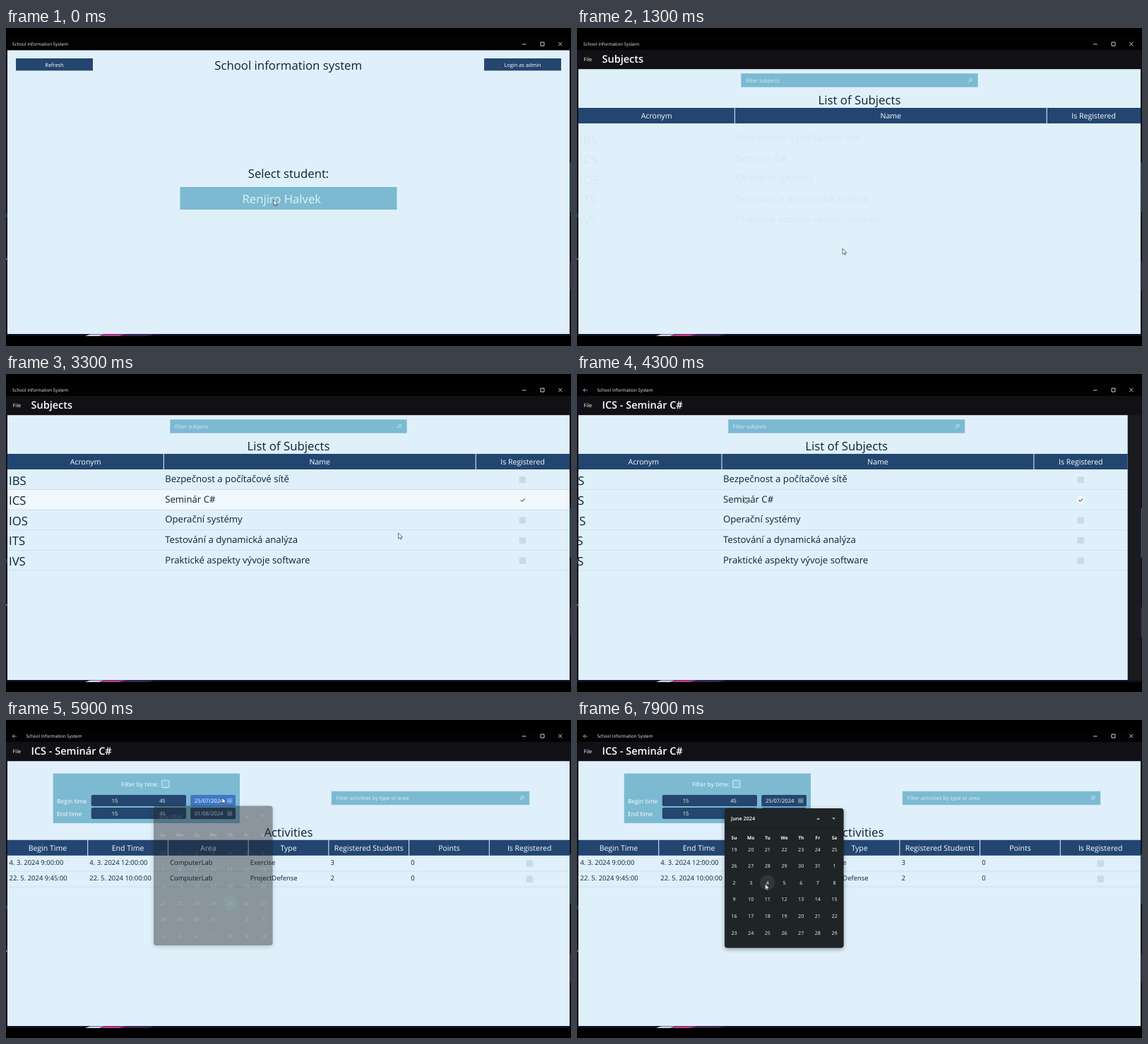
These frames come from a looping animation (800 px wide and 450 px high, 8 s). An HTML page:

```html
<!DOCTYPE html>
<html lang="en">
<head>
<meta charset="utf-8">
<title>School Information System</title>
<style>
html, body { margin: 0; width: 100%; height: 100%; overflow: hidden; background: #000; }
svg { display: block; width: 800px; height: 450px; }
text { font-family: "Open Sans", "Noto Sans", sans-serif; text-rendering: geometricPrecision; white-space: pre; }
</style>
</head>
<body>
<svg id="stage" viewBox="0 0 800 450" xmlns="http://www.w3.org/2000/svg"></svg>
<script>
const LOOP = 8000, STEP = 100;
const SKY = '#dff0fb', NAVY = '#24466f', TEAL = '#7cbad2', INK = '#0c2233', BLUE = '#3f78c6';
const WHITE = '#fff', PALE = '#e2f2f9';

// Drawing helpers
const rect = (x, y, x2, y2, fill, extra = '') =>
  `<rect x="${x}" y="${y}" width="${x2 - x}" height="${y2 - y}" fill="${fill}" ${extra}/>`;
const text = (s, x, y, size, fill = INK, extra = '') =>
  `<text x="${x}" y="${y}" font-size="${size}" fill="${fill}" ${extra}>${s}</text>`;
const mid = (s, x, y, size, fill, extra = '') =>
  text(s, x, y, size, fill, 'text-anchor="middle" ' + extra);
const line = (d, color, w = 0.8) =>
  `<path d="${d}" fill="none" stroke="${color}" stroke-width="${w}"/>`;
const group = (id, body, extra = '') => `<g id="${id}" ${extra}>${body}</g>`;

const lens = (x, y) =>
  `<circle cx="${x + 0.8}" cy="${y - 0.8}" r="2" fill="none" stroke="${PALE}" stroke-width=".7"/>` +
  line(`M${x - 0.6} ${y + 0.6}L${x - 3} ${y + 3}`, PALE);
const searchBox = (x, y, x2, hint) =>
  rect(x, y, x2, y + 19, TEAL, 'stroke="#8fc6da" stroke-width=".6"') +
  text(hint, x + 6.5, y + 12.2, 7.4, '#d6ecf5') + lens(x2 - 10.5, y + 9.5);
const check = (x, y) => rect(x - 4.7, y - 4.7, x + 4.7, y + 4.7, '#cbdbe5', 'rx="1.6"');
const rule = y => rect(2, y - 0.4, 798, y + 0.4, '#c9dde8');

function tableHead(y, edges, labels) {
  return rect(2, y, 798, y + 22, '#234671') + labels.map((s, i) =>
    mid(s, (edges[i] + edges[i + 1]) / 2, y + 15.2, 10.5, WHITE) +
    (i ? rect(edges[i] - 0.5, y, edges[i] + 0.5, y + 22, '#e6f2fa') : '')).join('');
}

// Window, desktop edges and title bar
const desktop = rect(0, 0, 800, 450, '#000') +
  rect(0, 32, 800, 436, '#0a0f22') +
  rect(0, 262, 1.6, 268, '#2c4a80') + rect(0, 326, 1.6, 328, '#9aa6c8') +
  rect(798.4, 190, 800, 260, '#36577f') + rect(798.4, 330, 800, 372, '#4d2a66') +
  '<path d="M112 436L120 433H140L132 436Z" fill="#d8d3e6"/>' +
  '<path d="M134 436L141 433H172L160 436Z" fill="#c53a9c"/>' +
  '<path d="M160 436L172 433H212L200 436Z" fill="#3a2260"/>' +
  rect(1.5, 14, 798.5, 433.5, '#1b1a1f') + rect(0, 14, 800, 31.5, '#020203');
const controls = line('M731 23H736.5', WHITE) + line('M757 20.2H762V25.2H757Z', WHITE) +
  line('M782.2 20L787.4 25.2M787.4 20L782.2 25.2', WHITE);
const back = line('M15 23H9M11.6 20.3L9 23L11.6 25.7', '#ddd', 0.7);

// Page 1: student picker
const button = (x, s) => rect(x, 43, x + 109, 60.3, NAVY) + mid(s, x + 54.5, 54.5, 7.4, WHITE);
const login = rect(2, 31.5, 798, 433, SKY) + button(14, 'Refresh') + button(677, 'Login as admin') +
  mid('School information system', 399.7, 59.3, 16.8) +
  mid('Select student:', 400, 212, 16.7) +
  rect(246.5, 225, 553.5, 257, TEAL) + text('Renjiro Halvek', 334.5, 247.8, 16.7, PALE);

// Page 2: subjects
const subjectList = [
  ['IBS', 'Bezpečnost a počítačové sítě'], ['ICS', 'Seminár C#'], ['IOS', 'Operační systémy'],
  ['ITS', 'Testování a dynamická analýza'], ['IVS', 'Praktické aspekty vývoje software']];
const rows = subjectList.map(([code, name], i) => {
  const y = 135 + i * 28.6;
  const box = i === 1
    ? `<circle cx="731.5" cy="${y + 14.6}" r="5.4" fill="#f6fbfe"/>` +
      line(`M728.7 ${y + 14.8}L730.7 ${y + 16.7}L734.4 ${y + 12.9}`, '#111', 1)
    : check(731.4, y + 14.8);
  return text(code, 4, y + 21.5, 16.7) + text(name, 225.2, y + 18.1, 13.2) + box + rule(y + 28.6);
}).join('');
const subjects = rect(2, 58, 798, 433, SKY) + searchBox(232.5, 64.5, 567.3, 'Filter subjects') +
  mid('List of Subjects', 400, 108.3, 16.8) +
  tableHead(113, [2, 223.3, 665.2, 798], ['Acronym', 'Name', 'Is Registered']) +
  group('hoverRow', rect(2, 164, 798, 191.8, '#f0f8fd')) + group('rows', rows);

// Page 3: activities
const cols = Array.from({ length: 8 }, (_, i) => 2 + i * 796 / 7);
const activityList = [
  ['4. 3. 2024 9:00:00', '4. 3. 2024 12:00:00', 'ComputerLab', 'Exercise', '3', '0'],
  ['22. 5. 2024 9:45:00', '22. 5. 2024 10:00:00', 'ComputerLab', 'ProjectDefense', '2', '0']];
const calendarIcon = (x, y) =>
  line(`M${x - 3} ${y - 2.6}H${x + 3}V${y + 3}H${x - 3}ZM${x - 3} ${y - 0.9}H${x + 3}M${x - 3} ${y + 1}H${x + 3}M${x - 1} ${y - 1}V${y + 3}M${x + 1} ${y - 1}V${y + 3}`, '#cfdbea', 0.5);
const pickers = (y, label, date, id) => text(label, 72, y + 11.5, 8.5, WHITE) +
  rect(120.7, y, 255, y + 16, NAVY, `rx="2" id="${id}Time"`) +
  mid('15', 154, y + 10.7, 7.4, WHITE) + mid('45', 221.5, y + 10.7, 7.4, WHITE) +
  rect(261.2, y, 325, y + 16.3, NAVY, `rx="2" id="${id}Date"`) +
  text(date, 267, y + 10.7, 7.6, WHITE) + calendarIcon(316.7, y + 8);
const activities = rect(2, 58, 798, 433, SKY) + rect(66.7, 75.7, 331, 146, TEAL) +
  text('Filter by time:', 163, 94, 8.4, WHITE) +
  rect(220.5, 85.2, 231, 95.7, '#8ac1d7', 'rx="2" stroke="#f2fafd" stroke-width=".8"') +
  pickers(106, 'Begin time', '25/07/2024', 'begin') + pickers(124, 'End time', '01/08/2024', 'end') +
  searchBox(461, 101, 741, 'Filter activities by type or area') +
  mid('Activities', 400, 165.3, 16.8) +
  tableHead(169.8, cols, ['Begin Time', 'End Time', 'Area', 'Type', 'Registered Students', 'Points', 'Is Registered']) +
  activityList.map((cells, r) => {
    const y = 192 + r * 22;
    return cells.map((s, i) => text(s, cols[i] + 2.6, y + 12.6, 9.45)).join('') +
      check(741.2, y + 11) + rule(y + 22);
  }).join('');

// Calendar popup
const ROW = 23.6, TOP = 191.6, DAY = 864e5;
const dayX = i => 222.5 + i * 23.67;
const firstSunday = Date.UTC(2024, 5, 30);
let days = '<circle cx="317.2" cy="262.4" r="11" fill="#1f5a30" stroke="#101c14" stroke-width=".8"/>';
for (let k = -8; k < 7; k++)
  for (let i = 0; i < 7; i++)
    days += mid(new Date(firstSunday + (k * 7 + i) * DAY).getUTCDate(), dayX(i), TOP + k * ROW + 2.6, 7.1, '#f4f5f6');
const calendar =
  rect(209, 125, 377.6, 322.6, '#1f2427', 'rx="4" style="filter:drop-shadow(0 2px 3px #0005)"') +
  rect(209, 152.6, 377.6, 153.3, '#171b1e') +
  group('calBody',
    text('', 218, 142.3, 7.3, WHITE, 'font-weight="600" id="month"') +
    '<path d="M339.2 141L341.5 138.2L343.8 141Z M361.2 138.2L363.5 141L365.8 138.2Z" fill="#b9bec2"/>' +
    ['Su', 'Mo', 'Tu', 'We', 'Th', 'Fr', 'Sa'].map((s, i) =>
      mid(s, dayX(i), 168.8, 6.5, WHITE, 'font-weight="700"')).join('') +
    `<g clip-path="url(#dayArea)"><circle id="dayHover" cx="269.6" r="10.7" fill="#30373c"/>${group('days', days)}</g>`);

document.getElementById('stage').innerHTML =
  `<defs><clipPath id="dayArea">${rect(209, 176, 378, 319, WHITE)}</clipPath>
  <clipPath id="content">${rect(2, 31, 798, 433.3, WHITE)}</clipPath></defs>` + desktop +
  `<g clip-path="url(#content)">${group('login', login)}${group('subjects', subjects)}${group('activities', activities)}</g>` +
  group('navBar', rect(1.5, 31, 798.5, 58.2, '#111015') + text('File', 9.6, 46.6, 7.3, WHITE) +
    text('', 35.5, 48.6, 14.5, WHITE, 'font-weight="600" id="heading"')) +
  group('back', back) + text('School Information System', 9, 25.4, 6.3, '#f0f0f0', 'id="title"') + controls +
  group('calendar', calendar) +
  group('cursor', '<path d="M0 0V8.2L2 6.4L3.2 9L4.5 8.5L3.3 5.9H5.9Z" fill="#fff" stroke="#1d2730" stroke-width=".65"/>');

const el = {};
document.querySelectorAll('[id]').forEach(n => el[n.id] = n);

// Motion: each key is [time, value, ...]
const keys = {
  cursor: [[0, 379, 243], [500, 379, 243], [1000, 376, 300], [1300, 376, 312], [1900, 376, 312], [2500, 560, 290],
    [2900, 630, 185], [3300, 555.6, 225], [3900, 237, 174.5], [4500, 237, 174.5], [5000, 185.4, 121.5],
    [5200, 185.4, 121.5], [5600, 306, 110], [6100, 306, 110], [6600, 270, 226], [6900, 266.4, 232]],
  rise: [[800, 24], [900, 8], [1000, 2], [1100, 0]],
  rowsIn: [[1200, 0, 9], [1300, 0.04, 7], [1400, 0.5, 3], [1500, 0.85, 1], [1600, 1, 0]],
  leave: [[4200, 0, 1], [4300, -18.3, 1], [4400, -130, 0.3]],
  enter: [[4400, 200, 0], [4500, 48, 0.8], [4600, 12, 1], [4700, 3, 1], [4800, 0, 1]],
  popup: [[5800, 0, -8, 0], [5900, 0.44, -3.5, 0.3], [6000, 0.85, -1, 0.8], [6100, 1, 0, 1]],
  scroll: [[6900, 0], [7000, 32], [7200, 66.5], [7300, 66.5], [7400, 100], [7600, 133]]
};
function at(name, t) {
  const k = keys[name], n = k.findIndex(p => p[0] > t);
  if (n === 0) return k[0].slice(1);
  if (n < 0) return k[k.length - 1].slice(1);
  const a = k[n - 1], b = k[n], f = (t - a[0]) / (b[0] - a[0]);
  return a.slice(1).map((v, i) => v + (b[i + 1] - v) * f);
}
const within = (t, a, b) => t >= a && t < b;
const show = (node, on) => node.setAttribute('display', on ? 'inline' : 'none');
const move = (node, x, y) => node.setAttribute('transform', `translate(${x} ${y})`);
const fade = (node, v) => node.setAttribute('opacity', v);
const tint = (node, on) => node.setAttribute('fill', on ? BLUE : NAVY);

function draw(t) {
  const detail = t >= 4300;
  show(el.login, t < 800);
  show(el.navBar, t >= 800);
  show(el.subjects, within(t, 800, 4450));
  show(el.activities, t >= 4450);
  show(el.back, detail);
  el.title.setAttribute('x', detail ? 28.5 : 9);
  el.heading.textContent = detail ? 'ICS - Seminár C#' : 'Subjects';

  const [outX, outFade] = at('leave', t), [inX, inFade] = at('enter', t);
  move(el.subjects, outX, at('rise', t)[0]);
  fade(el.subjects, outFade);
  move(el.activities, inX, 0);
  fade(el.activities, inFade);

  const [rowFade, rowY] = at('rowsIn', t);
  fade(el.rows, rowFade);
  move(el.rows, 0, rowY);
  show(el.hoverRow, within(t, 2900, 3400) || within(t, 3900, 4200));

  tint(el.endTime, within(t, 4900, 5200));
  tint(el.beginTime, within(t, 5200, 5500));
  tint(el.beginDate, within(t, 5500, 6200));

  const [popFade, popY, bodyFade] = at('popup', t), scroll = at('scroll', t)[0];
  show(el.calendar, popFade > 0);
  fade(el.calendar, popFade);
  move(el.calendar, 0, popY);
  fade(el.calBody, bodyFade);
  move(el.days, 0, scroll);
  el.month.textContent = scroll > 60 ? 'June 2024' : 'July 2024';
  const hoverRow = Math.round((230 - TOP - scroll) / ROW);
  show(el.dayHover, t >= 6600);
  el.dayHover.setAttribute('cy', TOP + scroll + hoverRow * ROW);

  move(el.cursor, ...at('cursor', t));
}

const start = performance.now();
function tick() {
  const t = (performance.now() - start) % LOOP;
  draw(Math.floor(t / STEP) * STEP);
  requestAnimationFrame(tick);
}
tick();
</script>
</body>
</html>
```
